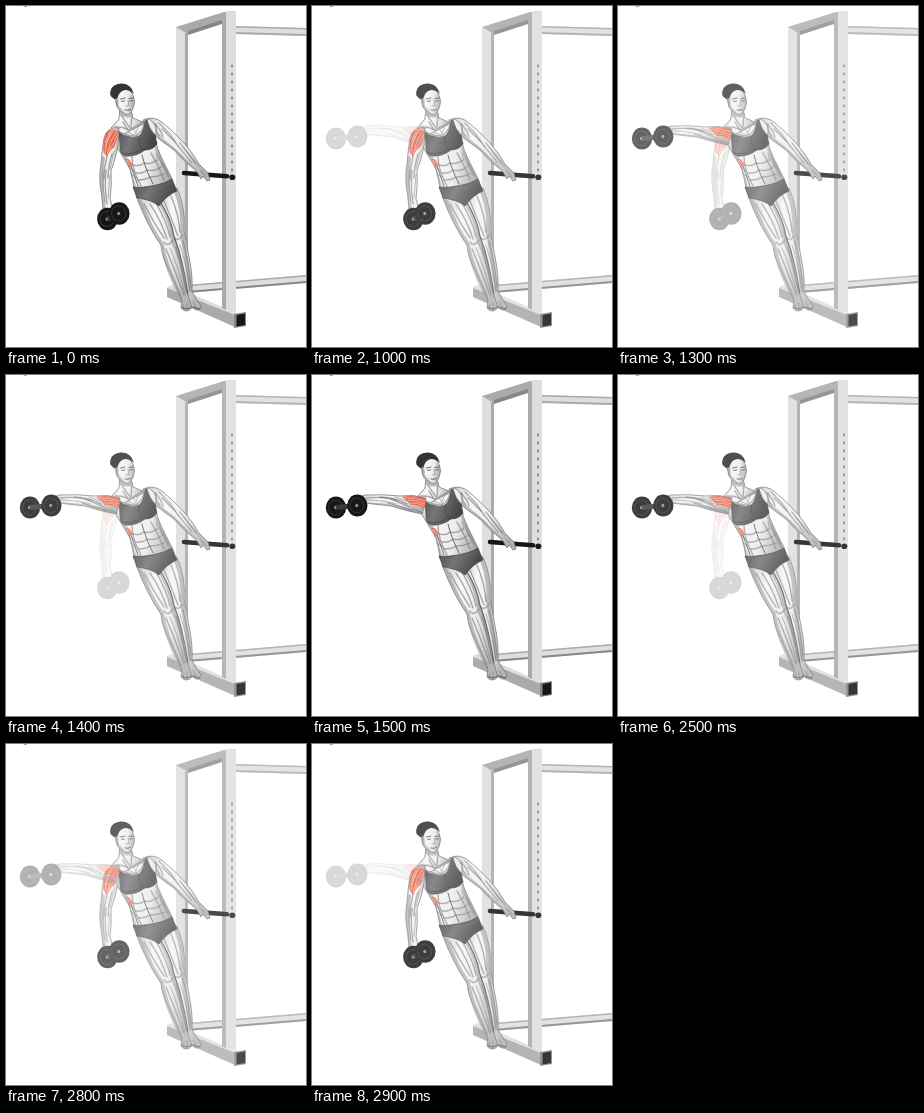
Animation, 300 px wide and 341 px high, one loop 3000 ms. Source, as an HTML page:

```html
<!DOCTYPE html>
<html lang="en">
<head>
<meta charset="utf-8">
<title>Leaning lateral raise</title>
<style>
html, body { margin: 0; width: 100%; height: 100%; overflow: hidden; background: #fff; }
svg { display: block; width: 100%; height: 100%; }
.skin { fill: url(#skin); stroke: #6c6c6c; stroke-width: .7; stroke-linejoin: round; }
.line { fill: none; stroke: #6f6f6f; stroke-width: .5; stroke-linecap: round; }
.soft { fill: none; stroke: #9c9c9c; stroke-width: 1.8; stroke-linecap: round; opacity: .4; }
.deep { fill: none; stroke: #484848; stroke-width: .8; stroke-linecap: round; }
.shade { fill: #8f8f8f; opacity: .55; }
.cloth { fill: url(#cloth); stroke: #3c3c3e; stroke-width: .6; }
.hair { fill: #343435; }
.red { fill: #e8674f; }
.fiber { fill: none; stroke: #fbd0c6; stroke-width: .7; }
.steel { fill: #dedede; }
.side { fill: #aaa; }
.under { fill: #868686; }
.iron { fill: #171718; }
.hub { fill: #8c8c8d; }
.ring { fill: none; stroke: #444; stroke-width: .7; }
</style>
</head>
<body>
<svg viewBox="0 0 300 341" preserveAspectRatio="none">
  <defs>
    <linearGradient id="skin" x1="0" x2="1" y1="0" y2=".2">
      <stop offset="0" stop-color="#c6c6c6"/>
      <stop offset=".35" stop-color="#f8f8f8"/>
      <stop offset=".7" stop-color="#ececec"/>
      <stop offset="1" stop-color="#b4b4b4"/>
    </linearGradient>
    <linearGradient id="cloth" x1="0" x2="1" y1="0" y2=".3">
      <stop offset="0" stop-color="#464648"/>
      <stop offset=".45" stop-color="#77777a"/>
      <stop offset="1" stop-color="#464648"/>
    </linearGradient>
    <g id="rack"></g>
    <g id="body"></g>
  </defs>
  <g id="low"></g>
  <g id="high"></g>
</svg>
<script>
const $ = id => document.getElementById(id);
const path = (cls, ...ds) => ds.map(d => `<path class="${cls}" d="${d}"/>`).join('');
const muscle = (...ds) => path('soft', ...ds) + path('line', ...ds);
const oval = (cls, x, y, rx, ry) => `<ellipse class="${cls}" cx="${x}" cy="${y}" rx="${rx}" ry="${ry}"/>`;

function rack() {
  let holes = '';
  for (let i = 0; i < 14; i++) holes += oval('under', 226, 60 + i * 8, 1, 1.7);
  return path('steel', 'M229 20L300 22V30L229 28Z', 'M181 279L300 269V277L181 287Z') +
    path('side', 'M229 20L300 22V23.5L229 21.5Z', 'M229 26L300 28V30L229 28Z', 'M181 279L300 269V270.5L181 280.5Z') +
    path('under', 'M181 285L300 275V277L181 287Z') +
    path('steel', 'M161 281L166 279L232 308V321L161 290Z') +
    path('side', 'M161 282L229 309V321L161 291Z') +
    path('steel', 'M170 21H182V285L170 282Z') +
    path('side', 'M179 27H182V285L179 284Z') +
    path('side', 'M170 21L218 6L229 5L219 16L182 28Z') +
    path('under', 'M182 25L219 13V17L182 29Z') +
    path('steel', 'M219 6L230 5V307L219 303Z') +
    path('side', 'M216 9L220 6V304L216 302Z') + holes +
    path('under', 'M228 308L240 306V320L228 322Z') +
    path('iron', 'M230.5 309L239 307.5V319L230.5 320.5Z') +
    '<path d="M178 167L221 170.3" stroke="#171718" stroke-width="4.6" stroke-linecap="round"/>' +
    oval('iron', 226.3, 171.2, 3, 2.8);
}

function head() {
  return path('skin', 'M114 101L113 113L105 122L118 128L139 117L127 112L125 104Z') +
    muscle('M115 109L124 122', 'M126 108L125 121', 'M117 116L122 124', 'M109 121Q116 120 123 124L136 117') +
    path('shade', 'M113 101Q119 109 125 106L125 111Q118 113 113 108Z') +
    path('skin', 'M109 92Q110 82 119 82Q127 84 128.5 95Q128 104 122.5 109Q115 108 111 101Z') +
    path('hair', 'M111 93Q108 94 107 92Q103 90 104.500 85Q106 78 115 77.500Q125 77 128 88Q124 84 119 84Q113 85 111 93Z') +
    path('shade', 'M109 92L112 92L113 100L119 107L122 109Q114 107 111 101Z') +
    path('deep', 'M114.500 93L119 92', 'M123 92.500L127 92', 'M119 104Q122 105 124.500 103.500', 'M115.500 95.300L118.500 95', 'M123.500 95L126.500 94.800') +
    path('line', 'M122 94L123 99.500L120 100', 'M111 95Q109 97 111.500 100');
}

function reachArm() {
  return path('skin', 'M137 114Q148 109 157 117Q167 125 178 137Q187 147 193 158L202 167L204 174L201 175L197 170L195 173L191 166Q180 157 170 145Q159 137 149 130Z') +
    path('shade', 'M150 127Q163 137 172 145L192 165L189 163Q178 157 168 145Q157 137 149 130Z') +
    muscle('M144 115Q154 120 157 131', 'M153 117Q165 128 172 140', 'M156 123L169 136', 'M150 118Q149 126 154 130',
      'M174 137L190 158', 'M172 140L186 157') +
    path('line', 'M178 142L193 161', 'M197 168L194 164', 'M200 171L197 166');
}

function legs() {
  return path('skin',
      'M151 193L171 182Q180 203 178 224Q180 235 183 251Q187 270 186 286L195 300Q193 306 188 303L179 293Q179 276 171 254Q166 236 161 222Z',
      'M130 190L153 194Q165 211 167 229Q174 244 176 261Q179 278 182 289L186 302Q180 308 175 302L176 294Q171 282 164 266Q156 252 155 239Q141 219 130 190Z') +
    path('shade', 'M131 191L136 195Q146 221 158 238Q160 255 176 289L175 294Q158 264 155 240Q141 220 131 191Z',
      'M171 183Q180 205 178 224L186 286L183 286Q179 255 174 228Q176 206 168 186Z',
      'M154 197Q166 214 168 230Q177 251 181 288L178 280Q174 255 165 236Q164 216 152 197Z') +
    muscle('M138 198Q148 217 158 232', 'M144 198Q155 214 161 233', 'M150 197Q161 216 164 231',
      'M158 195Q166 214 172 230', 'M165 190Q173 209 174 226',
      'M158 236Q162 242 167 234', 'M168 231Q172 237 177 229', 'M160 243Q168 262 178 289',
      'M170 241Q176 263 181 287', 'M177 235Q183 257 185 281') +
    path('line', 'M164 242Q171 257 179 288', 'M174 239Q181 260 184 285', 'M178 298L177 303', 'M181 297L181 304', 'M187 296L191 303') +
    path('deep', 'M155 197Q166 215 168 230Q177 253 182 288', 'M176 301Q180 305 185 301', 'M187 301L194 303');
}

function torso() {
  return path('skin', 'M107 121Q119 124 126 120L143 113Q153 119 149 132Q151 143 156 153L167 176L128 183Q127 172 124 163Q117 151 112 143Q105 132 107 121Z') +
    path('shade', 'M114 145L121 151L130 180L128 182L123 162Z', 'M150 140L167 173L163 174Q153 156 149 142Z') +
    muscle('M111 124Q120 125 126 121', 'M115 126Q121 130 130 130', 'M138 118Q137 125 131 129',
      'M126 151Q126 164 135 180', 'M145 147Q153 160 158 174', 'M127 159Q134 161 138 157Q144 159 151 154',
      'M130 167Q137 168 141 164Q149 166 155 161', 'M132 174Q140 174 144 171Q152 171 158 168') +
    path('line', 'M127 122L131 130', 'M119 125L129 129', 'M133 119L130 127', 'M121 155L127 159', 'M123 161L129 166',
      'M125 168L131 172', 'M150 147L152 155', 'M153 151L157 161', 'M156 157L162 169') +
    path('deep', 'M136 149Q139 162 147 178', 'M123 154Q127 166 132 180') +
    path('cloth', 'M110 124L112 123.500Q115 130 121 130Q128 133 133 130Q138 126 139 115L141 114Q143 123 149 129L151 138Q147 144 139 144Q130 151 119 150Q114 148 114 142Q115 133 110 124Z',
      'M127 181Q148 183 166 173L171 185Q161 189 153 200Q146 194 131 192Z') +
    path('deep', 'M133 131Q132 140 138 144', 'M116 147Q125 150 136 143Q143 144 149 138') +
    path('line', 'M128 184Q149 187 167 176') +
    path('red', 'M119.500 153Q124 152 126 158L124 162Q122 157 119.500 153Z') +
    path('fiber', 'M121 154L124.500 159', 'M122.500 153L125.500 157');
}

function dumbbell(x, y, dx, dy, r) {
  const disc = (cx, cy) => oval('iron', cx, cy, r, r + .8) +
    oval('ring', cx - .5, cy, r * .68, r * .72) + oval('hub', cx - .5, cy, 1.5, 1.8);
  return disc(x, y) + `<path d="M${x} ${y}l${dx} ${dy}" stroke="#3a3a3b" stroke-width="5"/>` + disc(x + dx, y + dy);
}

function lowArm() {
  return path('skin', 'M113 122Q101 120 98 132Q96 144 95 158Q92 174 96 190L97 204L102 209L107 203L104 193Q106 178 105 165Q110 151 112 140Z') +
    path('shade', 'M96 150Q92 175 97 204L100 204Q96 175 99 151Z') +
    muscle('M101 150Q98 162 98 173', 'M106 148Q102 160 102 172', 'M100 164Q98 181 101 198') +
    path('line', 'M108 145L104 163', 'M97 165Q96 180 99 196', 'M104 169L102 192', 'M99 201L101 207') +
    path('red', 'M112 125Q104 121 99.500 128Q96.500 138 97.500 146L101 151Q103 145 108 141Q112 133 112 125Z') +
    path('fiber', 'M108 124Q100 133 99 147', 'M110.500 125Q104 135 101 148', 'M112 127Q108 138 103 145', 'M104 125L99 137', 'M106 124L99 141') +
    dumbbell(101.500, 213, 11.700, -5.500, 10.400);
}

function highArm() {
  return path('skin', 'M114 123Q101 119 88 121Q70 119 53 120L42 124L42 130L53 128Q69 130 79 131Q94 136 110 139Z') +
    path('shade', 'M53 127Q75 128 86 131L109 136L110 139Q94 136 79 131L53 128Z') +
    muscle('M54 123Q70 121 85 125', 'M68 122Q84 123 95 129', 'M79 124L98 132', 'M76 128L100 135') +
    path('line', 'M54 125Q71 125 84 129', 'M83 122L94 126', 'M100 133L111 138') +
    path('red', 'M114 124Q103 119 90 122Q96 126 99 130Q106 129 112 133Q115 128 114 124Z') +
    path('fiber', 'M92 123Q103 122 113 126', 'M96 125Q106 125 113 129', 'M98 128Q106 127 112 131') +
    dumbbell(24, 132.500, 21.300, -2, 10.200);
}

const mark = path('deep', 'M18 0H19.500M20.500 0L19.800 .8');
const pose = arm => `${mark}<use href="#rack"/><use href="#body"/>${arm}`;

$('rack').innerHTML = rack();
$('body').innerHTML = reachArm() + legs() + torso() + head();
$('low').innerHTML = pose(lowArm());
$('high').innerHTML = pose(highArm());

// Share of the raised pose: sixths, one step every 100 ms.
function blend(t) {
  const step = from => Math.min(6, Math.max(0, Math.floor((t - from) / 100) + 1));
  return (step(1000) - step(2500)) / 6;
}

// Both poses are translucent while they cross, so the still parts pale too.
function draw(t) {
  const k = blend(t % 3000);
  $('low').setAttribute('opacity', 1 - k);
  $('high').setAttribute('opacity', k);
}

const start = performance.now();
function tick() {
  draw(performance.now() - start);
  requestAnimationFrame(tick);
}
tick();
</script>
</body>
</html>
```
